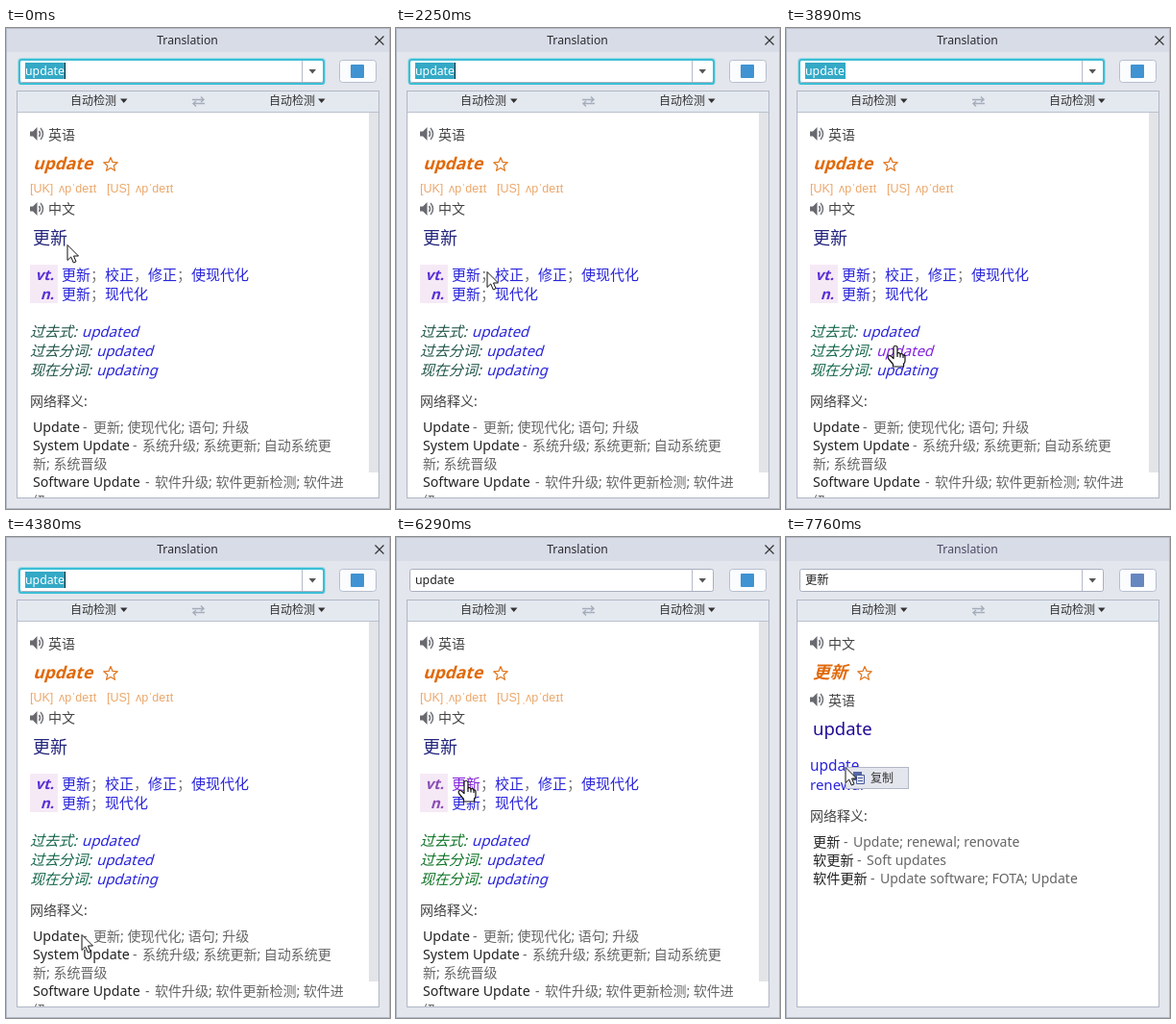
Animation, 400 px wide and 500 px high, one loop 8000 ms. Source, as an HTML page:

```html
<!DOCTYPE html>
<html lang="zh-CN">
<head>
<meta charset="utf-8">
<title>Translation</title>
<style>
html, body { margin: 0; width: 100%; height: 100%; overflow: hidden; background: #e3e6ed; }
svg { display: block; }
text { font: 14px "Noto Sans", "Noto Sans CJK SC", "Noto Sans CJK", sans-serif; fill: #444; white-space: pre; }
.small { font-size: 12px; fill: #333; }
.head { font-size: 17.5px; font-weight: bold; fill: #e0690a; }
.ipa { font: 12.5px "Liberation Sans", "DejaVu Sans", sans-serif; fill: #eba86c; }
.big { font-size: 18px; fill: #23257c; }
.pos { font-size: 15px; font-weight: bold; fill: var(--pos); }
.def { font-size: 15px; fill: #2a25da; }
.sep { font-size: 15px; fill: #777; }
.form { font-size: 15px; fill: var(--form); }
.val { font-size: 15px; fill: #2a25da; }
/* Slanted upright letters, sheared about the baseline */
.head, .pos, .form, .val { transform: skewX(-16deg); transform-box: fill-box; transform-origin: 0 78%; }
.key { font-size: 14.2px; fill: #222; }
.rest { fill: #666; }
.def.hover, .val.hover { fill: #8424dc; }
.key.hover, .rest.hover { fill: #111; }
</style>
</head>
<body>
<svg id="stage" width="400" height="500" viewBox="0 0 400 500">
  <defs>
    <g id="speaker">
      <path d="M0 4.5H3L7.5 0V14L3 9.5H0Z" fill="#686a70"/>
      <path d="M9.5 4Q11.5 7 9.5 10M11 1Q16 7 11 13" fill="none" stroke="#777a80" stroke-width="1.6"/>
    </g>
    <path id="star" d="M0 -7.5L2 -2.6L7.3 -2.2L3.2 1.2L4.5 6.3L0 3.5L-4.5 6.3L-3.2 1.2L-7.3 -2.2L-2 -2.6Z" fill="none" stroke="#e0761c" stroke-width="1.2" stroke-linejoin="round"/>
    <path id="down" d="M0 0H7.5L3.75 4.5Z"/>
    <clipPath id="view"><rect x="12" y="88" width="376" height="400"/></clipPath>
  </defs>

  <rect x=".5" y=".5" width="399" height="499" fill="#e3e6ed" stroke="#b4bcc9"/>
  <rect x="1" y="1" width="398" height="24" fill="#d8dce6"/>
  <text id="title" class="small" x="189" y="17" text-anchor="middle" style="font-size:12.2px">Translation</text>
  <path id="close" d="M384.5 8.5L393.5 17.5M393.5 8.5L384.5 17.5" stroke="#333" stroke-width="1.2"/>

  <rect x="14.5" y="33.5" width="316" height="23" rx="2" fill="#fff" stroke="#a9afbe"/>
  <g id="focus" fill="none">
    <rect x="12.5" y="31.5" width="320" height="27" rx="3" stroke="#9fdbe6"/>
    <rect x="14" y="33" width="317" height="25" rx="2" stroke="#3bbfd6" stroke-width="2"/>
  </g>
  <path d="M308.5 34V56" stroke="#b4bac8"/>
  <use href="#down" x="315.5" y="43" fill="#555"/>
  <rect id="selection" x="20" y="36" width="42" height="17" fill="#34a9c6"/>
  <text id="query" class="small" x="20" y="49" style="font-size:12.3px"></text>
  <path id="caret" d="M61.5 36V53" stroke="#222"/>
  <rect x="347.5" y="33.5" width="38" height="23" rx="3" fill="#fbfcfe" stroke="#b7becd"/>
  <rect id="icon" x="359" y="38" width="14" height="14" rx="1"/>

  <rect x="11.5" y="65.5" width="377" height="423" fill="#fff" stroke="#b0b7c5"/>
  <rect x="12" y="66" width="376" height="21" fill="#e4e9f0"/>
  <path d="M12 87.5H388" stroke="#b9c0cc"/>
  <text class="small" x="67" y="80">自动检测</text>
  <use href="#down" x="119" y="73.5" fill="#333"/>
  <text class="small" x="274" y="80">自动检测</text>
  <use href="#down" x="325" y="73.5" fill="#333"/>
  <path d="M194 74.5H205M203 71.5L206 74.5L203 77M207 78.5H196M198 76L195 78.5L198 81.5" fill="none" stroke="#a5adba" stroke-width="1.4"/>

  <g id="english" clip-path="url(#view)">
    <rect x="378" y="88" width="10" height="374" fill="#e3e4e8"/>
    <use href="#speaker" x="25" y="103"/>
    <text x="44" y="116">英语</text>
    <text class="head" x="28" y="147">update</text>
    <use href="#star" x="109" y="142"/>
    <text class="ipa" x="25" y="171">[UK]</text>
    <text class="ipa" x="55" y="171">ʌpˈdeɪt</text>
    <text class="ipa" x="105" y="171">[US]</text>
    <text class="ipa" x="135" y="171">ʌpˈdeɪt</text>
    <g id="stress"><text class="ipa" x="51" y="171">ˌ</text><text class="ipa" x="131" y="171">ˌ</text></g>
    <use href="#speaker" x="25" y="181"/>
    <text x="44" y="193">中文</text>
    <text class="big" x="28" y="225">更新</text>

    <rect x="25" y="246" width="29" height="40" fill="#f6e9f6"/>
    <text class="pos" x="50" y="262" text-anchor="end">vt.</text>
    <text class="pos" x="50" y="282" text-anchor="end">n.</text>
    <text class="def" x="58" y="262">更新</text><text class="sep" x="88" y="262">；</text>
    <text class="def" x="103" y="262">校正</text><text class="sep" x="133" y="262">，</text>
    <text class="def" x="148" y="262">修正</text><text class="sep" x="178" y="262">；</text>
    <text class="def" x="193" y="262">使现代化</text>
    <text class="def" x="58" y="282">更新</text><text class="sep" x="88" y="282">；</text>
    <text class="def" x="103" y="282">现代化</text>

    <text class="form" x="25" y="321">过去式:</text><text class="val" x="79" y="321">updated</text>
    <text class="form" x="25" y="341">过去分词:</text><text class="val" x="94" y="341">updated</text>
    <text class="form" x="25" y="361">现在分词:</text><text class="val" x="94" y="361">updating</text>

    <text x="25" y="393">网络释义:</text>
    <text class="key" x="28" y="420">Update</text><text class="rest" x="80" y="420">-</text>
    <text class="rest link" x="91" y="420">更新</text><text class="rest" x="119" y="420">; 使现代化; 语句; 升级</text>
    <text class="key" x="28" y="439">System Update</text><text class="rest" x="132" y="439">-</text>
    <text class="rest" x="142" y="439">系统升级; 系统更新; 自动系统更</text>
    <text class="rest" x="28" y="458">新; 系统晋级</text>
    <text class="key" x="28" y="477">Software Update</text><text class="rest" x="145" y="477">-</text>
    <text class="rest" x="155" y="477">软件升级; 软件更新检测; 软件进</text>
    <text class="rest" x="28" y="497">级</text>
  </g>

  <g id="chinese">
    <use href="#speaker" x="25" y="103"/>
    <text x="44" y="116">中文</text>
    <text class="head" x="28" y="147" style="font-size:18px">更新</text>
    <use href="#star" x="82" y="142"/>
    <use href="#speaker" x="25" y="162"/>
    <text x="44" y="175">英语</text>
    <text class="big" x="28" y="206" style="font-size:18.5px;fill:#220a96">update</text>
    <text class="def" x="25" y="243" style="font-size:15.4px">update</text>
    <text class="def" x="25" y="263">renewal</text>
    <text x="25" y="295">网络释义:</text>
    <text class="key" x="28" y="322">更新</text><text class="rest" x="60" y="322">-</text>
    <text class="rest" x="70" y="322">Update; renewal; renovate</text>
    <text class="key" x="28" y="341">软更新</text><text class="rest" x="74" y="341">-</text>
    <text class="rest" x="84" y="341">Soft updates</text>
    <text class="key" x="28" y="360">软件更新</text><text class="rest" x="88" y="360">-</text>
    <text class="rest" x="98" y="360">Update software; FOTA; Update</text>
  </g>

  <g id="menu">
    <rect x="62.5" y="239.5" width="65" height="22" fill="#e4e6ee" stroke="#b3b8c6"/>
    <path d="M70 244H79V253H70Z" fill="#5567a4"/>
    <path d="M73.5 247.5H81.5V256.5H73.5Z" fill="#dfe4f2" stroke="#4a5c9c"/>
    <path d="M75 250.5H80M75 253.5H80" stroke="#4a5c9c"/>
    <text class="small" x="88" y="255">复制</text>
  </g>

  <g id="cursor" stroke="#111" stroke-linejoin="round">
    <path id="arrow" fill="#fff" d="M0 .5V16.5L3.7 13L6.3 19L9 17.8L6.5 12H11.5Z"/>
    <g id="hand" fill="#fff" stroke-width="1.2">
      <path d="M-2 2Q-2 .5 0 .5Q2 .5 2 2V8Q4.5 7 5 9Q7.5 8 8 10Q10 9.5 10 12V16Q10 18 8.5 19V22H-2.5V19.5L-7.5 13.5Q-8.5 11 -6.5 10.5Q-5 10.3 -2 13.5Z"/>
      <path d="M2 8V12M5 9V12.5M8 10V13" fill="none"/>
    </g>
  </g>
</svg>

<script>
const LOOP = 8000, STEP = 70, BLUR = 6290, RESULT = 6420, MENU = 7760;
const $ = id => document.getElementById(id);
const show = (id, on) => { $(id).style.display = on ? '' : 'none'; };

// Pointer strokes: start time, number of steps, points along the way
const strokes = [
  [1500, 5, [64, 225], [76, 256]],
  [2110, 6, [76, 256], [95, 253], [115, 256]],
  [2660, 12, [115, 256], [117, 270], [118, 281], [117, 314]],
  [3490, 2, [117, 314], [117, 322]],
  [3890, 12, [117, 322], [105, 355], [79, 413], [74, 415]],
  [4990, 5, [74, 415], [90, 417], [107, 415]],
  [5470, 9, [107, 415], [100, 355], [73, 253]],
  [6950, 4, [73, 253], [69, 241]],
  [7490, 2, [69, 241], [62, 239]]
];

function pointer(t) {
  const stroke = strokes.filter(s => s[0] <= t).pop();
  if (!stroke) return strokes[0][2];
  const [start, steps, ...pts] = stroke;
  const done = Math.min(1, (Math.floor((t - start) / STEP) + 1) / steps);
  const along = done * (pts.length - 1);
  const i = Math.min(Math.floor(along), pts.length - 2);
  return pts[i].map((v, k) => Math.round(v + (pts[i + 1][k] - v) * (along - i)));
}

const linksIn = id => [...$(id).querySelectorAll('.def, .val, .key, .link')].map(el => ({
  el, x: +el.getAttribute('x'), y: +el.getAttribute('y'), w: el.getComputedTextLength()
}));
const pages = { english: linksIn('english'), chinese: linksIn('chinese') };

function draw(t) {
  const focused = t < BLUR, result = t >= RESULT, menu = t >= MENU;
  const [x, y] = pointer(t);
  let over = false;
  for (const { el, x: left, y: base, w } of pages[result ? 'chinese' : 'english']) {
    const hit = !menu && x >= left && x <= left + w && y >= base - 15 && y < base + 5;
    el.classList.toggle('hover', hit);
    over = over || hit;
  }
  $('cursor').setAttribute('transform', `translate(${x} ${y})`);
  show('hand', over);
  show('arrow', !over);

  show('focus', focused);
  show('selection', focused);
  show('caret', focused && (t < 1500 || t % 1060 < 530));
  $('query').textContent = result ? '更新' : 'update';
  $('query').style.fill = focused ? '#fff' : '#222';

  show('english', !result);
  show('chinese', result);
  show('stress', t >= 4990);
  show('menu', menu);
  show('close', !menu);
  $('title').style.fill = menu ? '#4c4a66' : '#2b2b33';
  $('icon').style.fill = menu ? '#6686c0' : '#3f93d2';
  const tone = $('stage').style;
  tone.setProperty('--pos', t < 4990 ? '#5a30d4' : '#8a4cb4');
  tone.setProperty('--form', t < 3890 ? '#1f5548' : t < 4990 ? '#12664a' : '#0c7424');
}

function tick() {
  draw(performance.now() % LOOP);
  requestAnimationFrame(tick);
}
tick();
</script>
</body>
</html>
```
